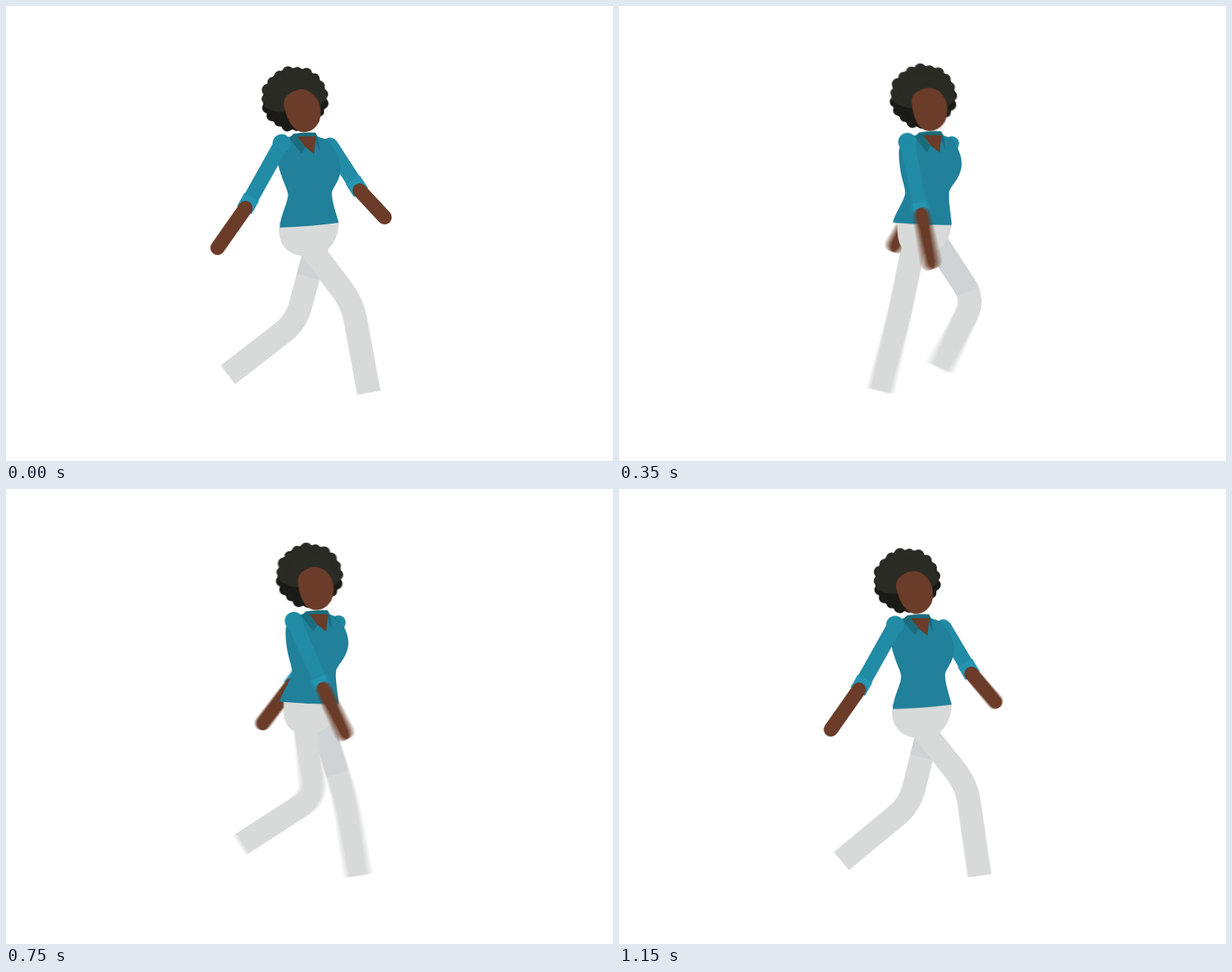
An HTML page with a canvas for the animation above (1200 ms loop, 800x600 px).

```html
<!DOCTYPE html>
<html lang="en">
<head>
<meta charset="utf-8">
<title>Walk cycle</title>
<style>
html, body { margin: 0; width: 100%; height: 100%; overflow: hidden; background: #fff; }
canvas { display: block; width: 100%; height: 100%; }
</style>
</head>
<body>
<canvas id="stage" width="800" height="600"></canvas>
<script>
const LOOP = 1200, STEP = 50, SHUTTER = 24, SAMPLES = 8, GROUND = 510;
const SKIN = '#6a3c29', SHIRT = '#21809a', SLEEVE = '#228ba5', CUFF = '#2595b2', COLLAR = '#1b6c7c';
const PANTS = '#d8dad9', SHADE = '#cfd3d5', HAIR = '#2a2b25', HAIR_BACK = '#1a1b16';

const screen = document.getElementById('stage').getContext('2d');
const layer = document.createElement('canvas');
layer.width = 800;
layer.height = 600;
const g = layer.getContext('2d');

// Mean plus cosine and sine amplitudes of each successive harmonic.
function wave(w, mean, ...amps) {
  return amps.reduce((sum, amp, i) => {
    const a = w * (1 + (i >> 1));
    return sum + amp * (i % 2 ? Math.sin(a) : Math.cos(a));
  }, mean);
}

// The whole pose follows from the phase w of the stride.
function poseAt(w) {
  const x = wave(w, 404, -4.1, -.9, -7, 1.4);
  const hem = 285.5 + 3.5 * Math.cos(4 * w), top = hem - 121.5;
  const faceX = x + wave(w, -1.3, 2, 1.2, -2.5, 3.1);
  const nearSwing = wave(w, 1.8, -34, 3.2, 3);
  const farSwing = wave(w, -11.8, 36, -.7, 8.8);
  return {
    x, hem, top, lean: x - 400,
    tilt: Math.max(-1.6, (400 - x) * .45),
    head: { x: faceX, y: hem - 151, tilt: (faceX - 413) * .42 },
    nearArm: bendArm([x - 29.5, top + 13.5], nearSwing, 98, nearSwing * 1.15 - 1.5, 64),
    farArm: bendArm([x + 32 - (x - 400) * .3, top + 15.5], farSwing, 90 - 18 * Math.cos(w),
      farSwing * 1.15 + 5, 57 - 9 * Math.cos(w)),
    nearLeg: {
      hip: [wave(w, 393, 6.2, -2, -1.6, 3.6), hem + 25],
      knee: [wave(w, 412, 41, -31.6, -1.5, 1, 5, 5), wave(w, 398, -10.8, 2.2, 4.8, 2)],
      ankle: [wave(w, 376.5, 91, -.4, 10.9, -2.7), Math.min(GROUND, wave(w, 496, 9, 24, 13, -4))]
    },
    farLeg: {
      hip: [wave(w, 414.5, -4.5, 3), hem + 25],
      knee: [wave(w, 432, -35, 20, -10, 4, -5, -6), wave(w, 404, 9.5, -9.3, 3.4, 4.8)],
      ankle: [wave(w, 393.5, -104.8, 6.7, 3.8, 1.4), Math.min(GROUND, wave(w, 494, -10, -17.5, 2.4, .5))],
      shade: wave(w, 63, 0, 0, -19, 8)
    }
  };
}

function reach(from, degrees, len) {
  const a = degrees * Math.PI / 180;
  return [from[0] + len * Math.sin(a), from[1] + len * Math.cos(a)];
}

function bendArm(shoulder, upper, upperLen, fore, foreLen) {
  const elbow = reach(shoulder, upper, upperLen);
  return { shoulder, elbow, hand: reach(elbow, fore, foreLen) };
}

function toward(a, b, dist) {
  const len = Math.hypot(b[0] - a[0], b[1] - a[1]) || 1;
  return [a[0] + (b[0] - a[0]) * dist / len, a[1] + (b[1] - a[1]) * dist / len];
}

function line(a, b, width, color, cap) {
  g.lineCap = cap;
  g.lineWidth = width;
  g.strokeStyle = color;
  g.beginPath();
  g.moveTo(...a);
  g.lineTo(...b);
  g.stroke();
}

function oval(x, y, rx, ry, color) {
  g.fillStyle = color;
  g.beginPath();
  g.ellipse(x, y, rx, ry, 0, 0, 7);
  g.fill();
}

function shape(path, color) {
  g.fillStyle = color;
  g.fill(new Path2D(path));
}

function drawLeg({ hip, knee, ankle, shade }) {
  g.lineCap = 'butt';
  g.lineJoin = 'round';
  g.lineWidth = 31;
  g.strokeStyle = PANTS;
  g.beginPath();
  g.moveTo(...hip);
  g.lineTo(...toward(knee, hip, 22));
  g.quadraticCurveTo(...knee, ...toward(knee, ankle, 22));
  g.lineTo(...ankle);
  g.stroke();
  if (shade) {
    g.setLineDash([shade, 999]);
    g.strokeStyle = SHADE;
    g.stroke();
    g.setLineDash([]);
  }
}

function drawArm({ shoulder, elbow, hand }, r) {
  oval(...shoulder, r, r, SLEEVE);
  line(shoulder, elbow, 20, SLEEVE, 'butt');
  line(toward(elbow, shoulder, 17), toward(elbow, shoulder, -3), 22, CUFF, 'butt');
  line(elbow, hand, 19, SKIN, 'round');
}

function drawPelvis({ hem, lean }) {
  const left = 360 + Math.max(0, lean - 6) * 2;
  shape(`M${left} ${hem - 4}V${hem + 8}C${left} ${hem + 28} 374 ${hem + 41} 397 ${hem + 41}
    C422 ${hem + 41} 438 ${hem + 24} 438.5 ${hem - 4}Z`, PANTS);
}

function drawTorso({ x, top, hem, lean, tilt }) {
  // Points higher above the hem follow the lean more.
  const pt = (px, h) => `${px + lean * h / 121.5} ${hem - h} `;
  shape(`M${pt(385, 118)}L${pt(372, 114)}C${pt(361, 110)}${pt(361, 97)}${pt(362, 90)}
    C${pt(364, 66)}${pt(374, 48)}${pt(374, 41)}C${pt(374, 30)}${pt(362, 13)}361 ${hem + tilt}
    Q400 ${hem + 2} 438.5 ${hem - tilt} C${pt(436, 16)}${pt(431, 32)}${pt(432, 43)}
    C${pt(434, 51)}${pt(446, 61)}${pt(445.5, 78)}C${pt(445, 92)}${pt(436, 104)}${pt(429, 113)}
    L${pt(417, 117)}Z`, SHIRT);
  g.save();
  g.translate(x, top);
  shape('M-14 1Q0 -1.5 15 -.5L18 5L20.5 24L14.5 9V5L-9 5L1 19L-3.5 27L-19.5 7Z', COLLAR);
  shape('M-9 4.5H15.5L13 27.5L1 18Z', SKIN);
  g.restore();
}

function drawCurls(count, color, lowest) {
  for (let i = 0; i < count; i++) {
    const a = i / count * Math.PI * 2, r = 7 + Math.sin(i * 2.4);
    if (Math.sin(a) < lowest) {
      oval(-8 + 37.5 * Math.cos(a), -17 + 36 * Math.sin(a), r, r, color);
    }
  }
}

function drawHead({ x, y, tilt }) {
  g.save();
  g.translate(x, y);
  g.rotate(tilt * Math.PI / 180);
  oval(-8, -17, 42, 40.5, HAIR_BACK);
  drawCurls(19, HAIR_BACK, 2);
  shape('M-50 -17A42 40.5 0 0 1 34 -17L35 -14Q31 -6 22 -2H-22Q-40 -3 -50 -14Z', HAIR);
  drawCurls(19, HAIR, -.05);
  shape('M-23.5 -9C-24 -22 -13 -26 -5 -28C12 -31 23.5 -15 23.5 0C23.5 17 13 28.5 0 28.5C-14 28.5 -22 14 -23.5 -9Z', SKIN);
  g.restore();
}

function drawPose(t) {
  const pose = poseAt(t / LOOP * Math.PI * 2);
  g.fillStyle = '#fff';
  g.fillRect(0, 0, 800, 600);
  drawArm(pose.farArm, 9.5);
  drawLeg(pose.farLeg);
  drawPelvis(pose);
  drawLeg(pose.nearLeg);
  drawTorso(pose);
  drawHead(pose.head);
  drawArm(pose.nearArm, 12);
}

// Average several poses across the shutter for motion blur.
function render(t) {
  for (let i = 0; i < SAMPLES; i++) {
    drawPose(t + ((i + .5) / SAMPLES - .5) * SHUTTER);
    screen.globalAlpha = 1 / (i + 1);
    screen.drawImage(layer, 0, 0);
  }
}

const start = performance.now();
let shown = -1;
function tick() {
  const t = Math.floor((performance.now() - start) % LOOP / STEP) * STEP;
  if (t !== shown) render(shown = t);
  requestAnimationFrame(tick);
}
tick();
</script>
</body>
</html>
```
